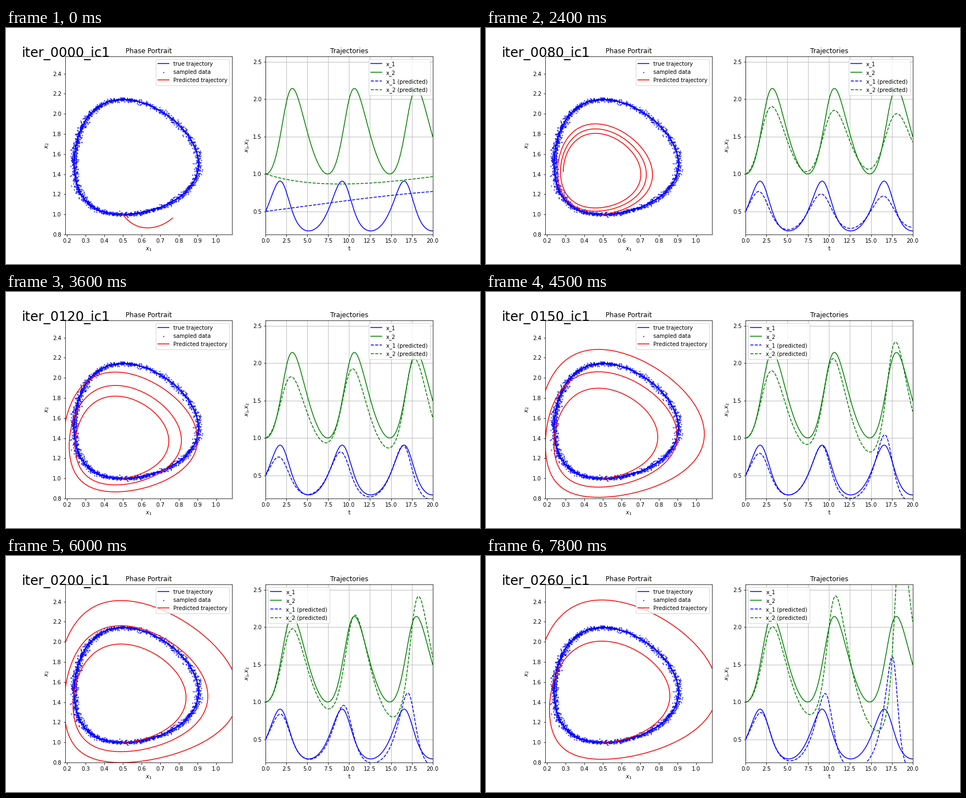
These frames come from a looping animation (864 px wide and 432 px high, 8000 ms). A matplotlib script:

```python
import numpy as np
import matplotlib.pyplot as plt
from matplotlib.animation import FuncAnimation

T_END = 20
START = np.array([0.5, 1.0])
STEP_MS, TICK_MS, LOOP_MS = 300, 100, 8000

# Centre (x, y), coupling (p, q) and growth (g, h) of the system
TRUE_MODEL = (0.5, 1.5, 1, 1, 0, 0)
LEARNED = {
    0: (0.828, 1.242, 0.0273, 0.183, -0.0652, -0.095),
    40: (0.527, 1.505, 0.853, 1.066, -0.17, -0.02),
    80: (0.46, 1.413, 1.047, 1.068, -0.058, 0),
    120: (0.46, 1.345, 1.115, 1.082, 0.107, 0),
    180: (0.493, 1.395, 1.066, 1.023, 0.165, 0),
    220: (0.486, 1.406, 1.027, 1.006, 0.098, 0),
    260: (0.495, 1.385, 1.05, 1.0, 0.23, 0),
}


def rates(state, model):
    """Predator and prey with a linear growth term in each equation."""
    xc, yc, p, q, g, h = model
    dx, dy = state[0] - xc, state[1] - yc
    return state * np.array([g * dx - p * dy, q * dx + h * dy])


def integrate(model, steps):
    dt = T_END / steps
    path = [START]
    for _ in range(steps):
        state = path[-1]
        k1 = rates(state, model)
        k2 = rates(state + dt / 2 * k1, model)
        k3 = rates(state + dt / 2 * k2, model)
        k4 = rates(state + dt * k3, model)
        path.append(state + dt / 6 * (k1 + 2 * k2 + 2 * k3 + k4))
    return np.linspace(0, T_END, steps + 1), np.array(path).T


def learned_model(iteration):
    columns = zip(*LEARNED.values())
    return [np.interp(iteration, list(LEARNED), column) for column in columns]


plt.rcParams.update({"font.family": "DejaVu Sans", "font.size": 10,
                     "figure.subplot.bottom": 0.125})
fig, (phase, series) = plt.subplots(1, 2, figsize=(12, 6), dpi=72)
label = fig.text(0.1267, 0.8773, "", fontsize=24, ha="center")

t, (x1, x2) = integrate(TRUE_MODEL, 2000)
rng = np.random.default_rng(8)
samples = np.array([x1, x2]) + rng.normal(0, 0.0095, (2, len(t)))

phase.plot(x1, x2, "b", label="true trajectory")
phase.scatter(*samples, s=1, c="b", label="sampled data")
orbit, = phase.plot([], [], "r", label="Predicted trajectory")
phase.set(title="Phase Portrait", xlabel="$x_1$", ylabel="$x_2$",
          xlim=(0.8 * x1.min(), 1.2 * x1.max()),
          ylim=(0.8 * x2.min(), 1.2 * x2.max()))
phase.legend(loc="upper right")

series.plot(t, x1, "b", label="x_1")
series.plot(t, x2, "g", label="x_2")
x1_line, = series.plot([], [], "b--", label="x_1 (predicted)")
x2_line, = series.plot([], [], "g--", label="x_2 (predicted)")
series.set(title="Trajectories", xlabel="t", ylabel="$x_1$,$x_2$",
           xlim=(0, T_END), ylim=(0.8 * x1.min(), 1.2 * x2.max()))
series.grid()


def update(tick):
    iteration = 10 * (tick * TICK_MS // STEP_MS)
    t_pred, (p1, p2) = integrate(learned_model(iteration), 400)
    label.set_text(f"iter_{iteration:04d}_ic1")
    orbit.set_data(p1, p2)
    x1_line.set_data(t_pred, p1)
    x2_line.set_data(t_pred, p2)
    # The legend moves away once the last peak reaches it
    crowded = p2[t_pred > 12.4].max() > 2.1
    series.legend(loc="upper left" if crowded else "upper right")
    return label, orbit, x1_line, x2_line


anim = FuncAnimation(fig, update, frames=LOOP_MS // TICK_MS, interval=TICK_MS,
                     repeat=True, repeat_delay=0, blit=False)
plt.show()
```
